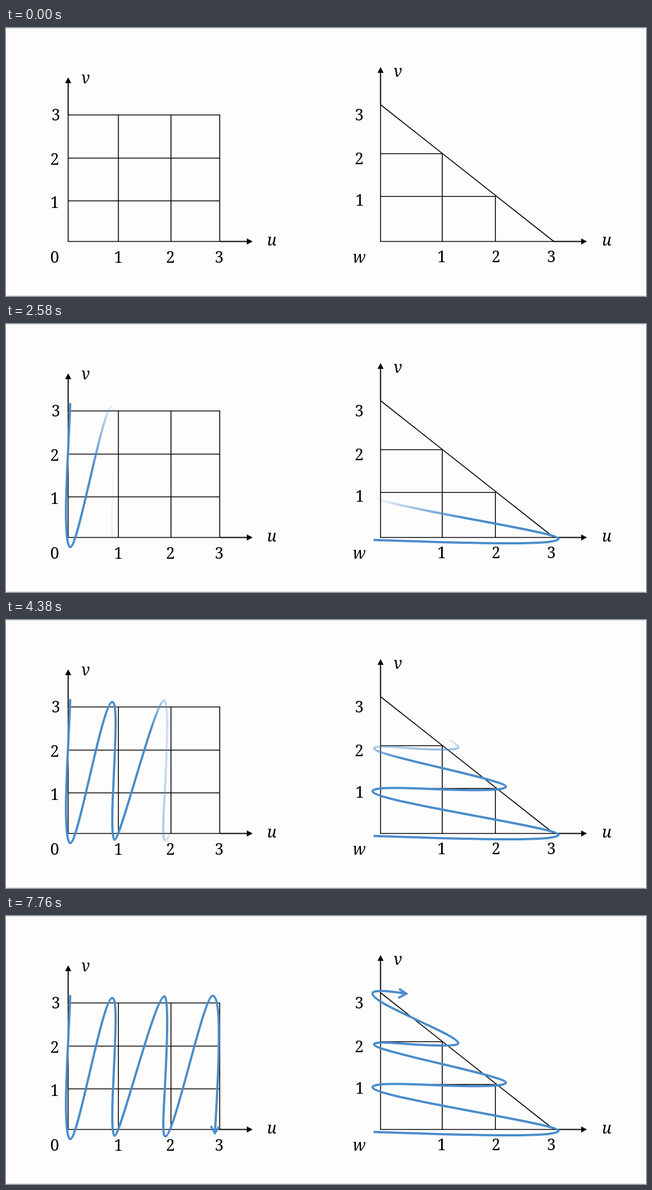
These frames come from a looping animation (1156 px wide and 484 px high, 7.78 s). An HTML page:

```html
<!DOCTYPE html>
<html lang="en">
<head>
<meta charset="utf-8">
<title>Grid traversal order</title>
<style>
  html, body { margin: 0; width: 100%; height: 100%; overflow: hidden; background: #fdfdfd; }
  svg { display: block; width: 1156px; height: 484px; }
  .grid { fill: none; stroke: #000; stroke-width: 1.6; }
  .axis { fill: none; stroke: #000; stroke-width: 2; }
  .route { fill: none; stroke: #4a8ccb; stroke-width: 4; }
  text { font: 28.5px "Noto Serif", serif; text-anchor: middle; }
  .var { font-style: italic; }
</style>
</head>
<body>
<svg viewBox="0 0 1156 484">
  <defs>
    <linearGradient id="fadeRight" gradientUnits="userSpaceOnUse" y1="0" y2="0">
      <stop offset="0" stop-color="#fff"/><stop offset="1" stop-color="#fff" stop-opacity="0"/>
    </linearGradient>
    <linearGradient id="fadeUp" gradientUnits="userSpaceOnUse" x1="0" x2="0">
      <stop offset="0" stop-color="#fff"/><stop offset="1" stop-color="#fff" stop-opacity="0"/>
    </linearGradient>
    <mask id="wipeRight" maskUnits="userSpaceOnUse" x="0" y="0" width="1156" height="484">
      <rect width="1156" height="484" fill="url(#fadeRight)"/>
    </mask>
    <mask id="wipeUp" maskUnits="userSpaceOnUse" x="0" y="0" width="1156" height="484">
      <rect width="1156" height="484" fill="url(#fadeUp)"/>
    </mask>
  </defs>

  <path d="M0 .5H1156M0 483.5H1156" stroke="#d6d6e4"/>

  <path class="grid" d="M112.3 157H386V385.5H112.3ZM112.3 235H386M112.3 312.3H386M203 157V385.5M298 157V385.5"/>
  <path class="axis" d="M112.3 157V98M386 385.5H437"/>
  <path d="M112.3 89l5.5 10.5h-11zM445.5 385.5l-10.5 -5.5v11z"/>

  <path class="grid" d="M676.5 138.5L989.5 385.5M676.5 227H788V385.5M676.5 304.2H884V385.5M676.5 138V385.5H990"/>
  <path class="axis" d="M676.5 138V80M989 385.5H1041"/>
  <path d="M676.5 70.5l5.5 10.5h-11zM1049.5 385.5l-10.5 -5.5v11z"/>

  <g id="labels"></g>

  <g mask="url(#wipeRight)">
    <path class="route" d="M116 143C113 230 107 300 108.5 355C109 385 112 403 116 403
      C131 403 174 148 192 148C203 148 196 240 194 300C191 350 191 397 196 397
      C207 397 269 145 286 145C294 145 291 230 288 290C285 350 281 398 288 398
      C304 398 357 144 373 144C386 144 385 210 384 250C383 300 380 345 377.5 391
      M370 379.5L377.3 392L385 380"/>
  </g>
  <g mask="url(#wipeUp)">
    <path class="route" d="M664 390C750 393 830 396 910 396C960 396 998 394 998 388
      C998 374 662 328 662 309C662 299 760 305 800 306.5C850 308 903 308 903 301
      C903 288 665 245 665 232C665 224 720 232 765 233.5C795 234.5 817 234 817 230
      C817 214 662 160 662 140C662 132 695 136 722 140
      M710 131.5L723 140.3L708.5 148"/>
  </g>
</svg>
<script>
  const LOOP = 7780, START = 1064, DURATION = 5470, FEATHER = 0.14;
  const $ = id => document.getElementById(id);

  // Each label: text, centre x, baseline y
  const labels = [
    ["3", 90, 167], ["2", 88, 247], ["1", 88, 325], ["0", 88, 424],
    ["1", 203, 424], ["2", 297, 424], ["3", 385, 424], ["v", 144, 100], ["u", 480, 393],
    ["3", 638, 167], ["2", 638, 246], ["1", 639, 321], ["w", 638, 424],
    ["1", 787, 423], ["2", 885, 423], ["3", 985, 423], ["v", 708, 88], ["u", 1085, 393]
  ];
  $("labels").innerHTML = labels.map(([s, x, y]) =>
    `<text x="${x}" y="${y}"${s > "9" ? ' class="var"' : ""}>${s}</text>`).join("");

  // Moves a soft edge across the span; progress 1 leaves it fully revealed
  function wipe(id, axis, from, to, progress) {
    const span = to - from, edge = from + span * (1 + FEATHER) * progress;
    $(id).setAttribute(axis + 1, edge - span * FEATHER);
    $(id).setAttribute(axis + 2, edge);
  }

  function draw() {
    const t = performance.now() % LOOP;
    const progress = Math.min(1, Math.max(0, (t - START) / DURATION));
    wipe("fadeRight", "x", 106, 388, progress);
    wipe("fadeUp", "y", 398, 131, progress);
    requestAnimationFrame(draw);
  }
  draw();
</script>
</body>
</html>
```
